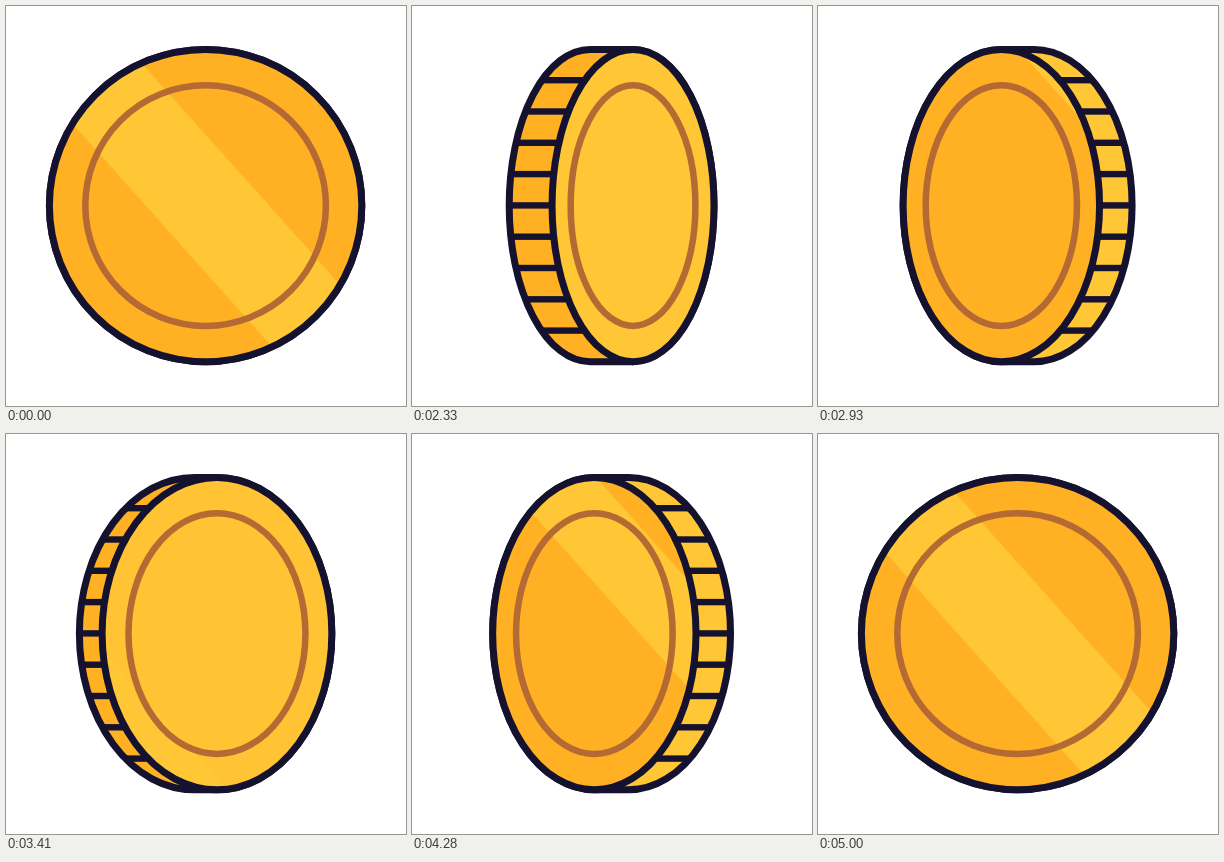
Write an HTML page with a canvas that moves like this. It is 400 px wide and 400 px high and loops after 5030 ms.

```html
<!DOCTYPE html>
<html lang="en">
<head>
<meta charset="utf-8">
<title>Spinning coin</title>
<style>
  html, body { margin: 0; width: 100%; height: 100%; overflow: hidden; background: #fff; }
  canvas { display: block; width: 400px; height: 400px; }
</style>
</head>
<body>
<canvas id="stage" width="400" height="400"></canvas>
<script>
const ctx = document.getElementById('stage').getContext('2d');
const DARK = '#14122f', ORANGE = '#ffb023', YELLOW = '#ffc636', BROWN = '#b46a32';
const LOOP = 5030, HOLD = 2000, STEP = 30;
const C = 199.6, R = 156.2, RING = 120.3, THICKNESS = 93, SLANT = 0.895;
const BAND_LEFT = 140, BAND_RIGHT = 263.5;

const easeIn = x => x * x * 1.21 / (x + 0.21);

// turn: 0 = facing the viewer, 1 = edge on; side: 1 = turning away, -1 = turning in
// glow: how far the face has faded from orange to yellow
function poseAt(t) {
  if (t < 600 || (t >= 1200 && t < 1800)) {
    const time = t % 1200, turn = easeIn(time / 600), s = (time / 210) ** 2;
    return {
      turn, depth: turn ** 1.06, side: 1, glow: Math.min(1, 0.87 * s),
      left: BAND_LEFT - 181 * s, right: BAND_RIGHT - 181 * s
    };
  }
  const last = t >= 1800;
  const u = last ? (3000 - t) / 1200 : (1200 - t) / 600;
  const turn = last ? u ** 2.06 : easeIn(u);
  const shift = turn * (last ? 252 : 540);
  return {
    turn, depth: last ? u ** 1.94 : turn ** 1.06, side: -1, glow: 0,
    left: BAND_LEFT + shift, right: BAND_RIGHT + shift * 0.69
  };
}

function ellipse(x, rx, ry) {
  ctx.beginPath();
  ctx.ellipse(x, C, rx, ry, 0, 0, 2 * Math.PI);
}

function fill(color, alpha = 1) {
  ctx.globalAlpha = alpha;
  ctx.fillStyle = color;
  ctx.fill();
  ctx.globalAlpha = 1;
}

function stroke(color, width) {
  ctx.strokeStyle = color;
  ctx.lineWidth = width;
  ctx.stroke();
}

function drawSide(rx, half, side) {
  const quarter = Math.PI / 2;
  ctx.beginPath();
  ctx.ellipse(C + half, C, rx, R, 0, -quarter, quarter);
  ctx.ellipse(C - half, C, rx, R, 0, quarter, 3 * quarter);
  ctx.closePath();
  fill(side > 0 ? ORANGE : YELLOW);
  stroke(DARK, 7);

  ctx.save();
  ctx.clip();
  ctx.fillStyle = DARK;
  for (let i = -4; i <= 4; i++) ctx.fillRect(0, C + 31.3 * i - 3.4, 400, 6.4);
  ctx.restore();
}

function drawFace(x, rx, { left, right, glow }) {
  ellipse(x, rx, R);
  fill(ORANGE);
  fill(YELLOW, glow);

  ctx.save();
  ctx.clip();
  const lean = 200 * SLANT;
  ctx.beginPath();
  ctx.moveTo(left - lean, 0);
  ctx.lineTo(right - lean, 0);
  ctx.lineTo(right + lean, 400);
  ctx.lineTo(left + lean, 400);
  fill(YELLOW);
  ctx.restore();

  ellipse(x, rx, R);
  stroke(DARK, 7);
  ellipse(x, rx * RING / R, RING);
  stroke(BROWN, 6.5);
}

function draw(t) {
  const pose = poseAt(t);
  const rx = Math.max(R * (1 - pose.turn), 0.01);
  const half = THICKNESS * pose.depth / 2;
  ctx.fillStyle = '#fff';
  ctx.fillRect(0, 0, 400, 400);
  drawSide(rx, half, pose.side);
  drawFace(C + pose.side * half, rx, pose);
}

const start = performance.now();
function tick() {
  const time = (performance.now() - start) % LOOP;
  draw(Math.max(0, Math.floor((time - HOLD) / STEP) * STEP));
  requestAnimationFrame(tick);
}
tick();
</script>
</body>
</html>
```
